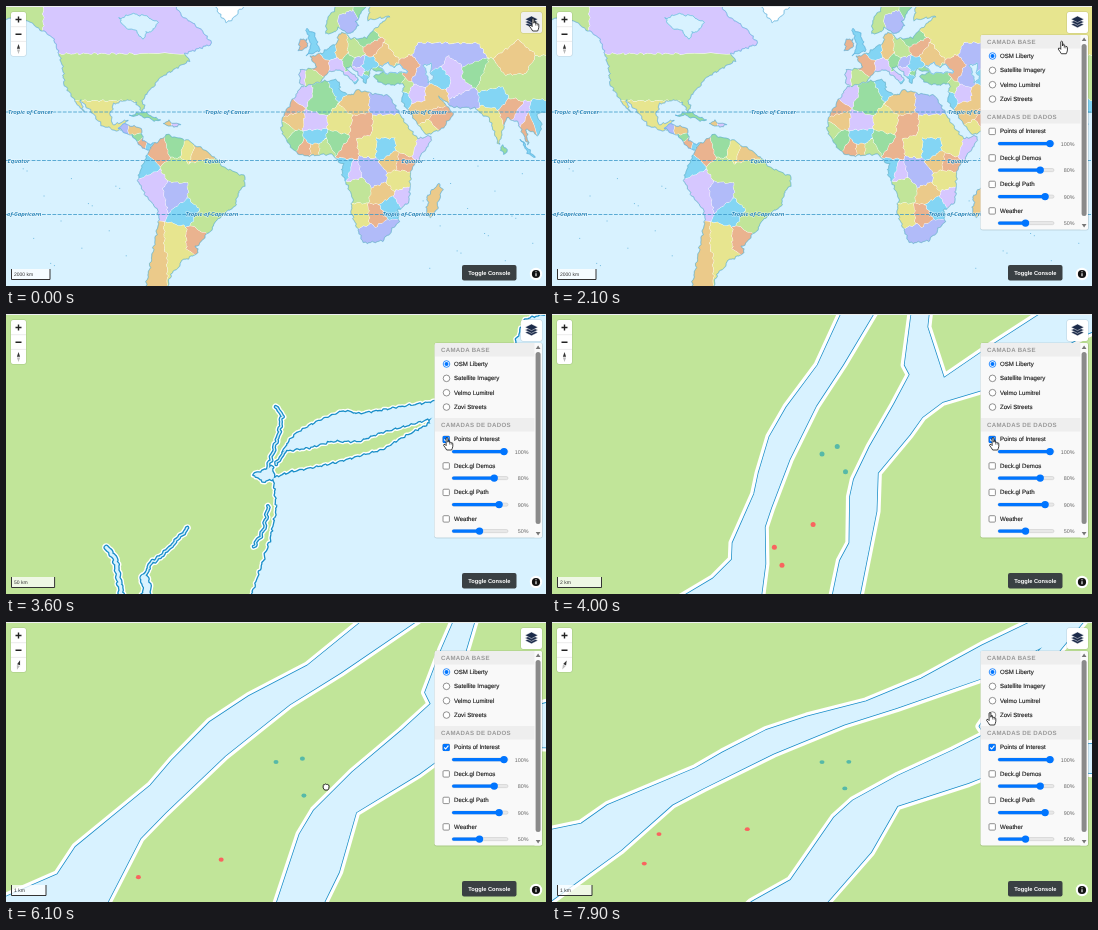
Animation, 540 px wide and 280 px high, one loop 8 s. Source, as an HTML page with a canvas:

```html
<!DOCTYPE html>
<html lang="pt">
<head>
<meta charset="utf-8">
<title>Map layers</title>
<style>
html,body{margin:0;width:100%;height:100%;overflow:hidden;background:#d8f2ff}
#stage{position:relative;width:540px;height:280px;overflow:hidden}
canvas,svg{position:absolute;left:0;top:0;width:540px;height:280px}
text{font-family:"Liberation Sans",Arial,sans-serif;font-size:6.1px;fill:#222;text-rendering:geometricPrecision}
.row{stroke:#222;stroke-width:.15px}
.head{font-weight:bold;letter-spacing:.3px;fill:#999}
.pct{font-size:5.4px;fill:#666;text-anchor:end}
</style>
</head>
<body>
<div id="stage">
<canvas id="map" width="540" height="280"></canvas>
<svg viewBox="0 0 540 280">
  <path d="M0 .5H540" stroke="#eef0f0"/>
  <g>
    <rect x="4.5" y="5.5" width="16" height="45" rx="2.5" fill="#000" opacity=".13"/>
    <rect x="5" y="6" width="15" height="44" rx="2" fill="#fff"/>
    <path d="M5 20.7H20M5 35.4H20" stroke="#ddd" stroke-width=".6"/>
    <path d="M9.5 13.5h6M12.5 10.5v6M9.5 28.2h6" stroke="#222" stroke-width="1.4"/>
    <g id="needle"><path d="M10.9 42.7L12.5 38L14.1 42.7Z" fill="#333"/><path d="M10.9 43.4L12.5 48L14.1 43.4Z" fill="#bbb"/></g>
  </g>
  <rect x="514.5" y="5.5" width="22" height="22" rx="2.5" fill="#000" opacity=".13"/>
  <rect id="layers" x="515" y="6" width="21" height="21" rx="2" fill="#fff"/>
  <g fill="#1c2b4a" stroke="#fff" stroke-width=".5">
    <path d="M519 18.5L525.5 15.5L532 18.5L525.5 21.8Z"/>
    <path d="M519 16L525.5 13L532 16L525.5 19.3Z"/>
    <path d="M519 13.3L525.5 10L532 13.3L525.5 16.6Z"/>
  </g>
  <rect id="bar" x="5" y="263" width="40" height="10.5" fill="#fff" fill-opacity=".75"/>
  <path id="edge" fill="none" stroke="#333"/>
  <text id="km" x="8" y="270" style="font-size:5px;fill:#333"></text>
  <rect x="456" y="259" width="54.5" height="15.5" rx="2" fill="#3a4043"/>
  <text x="483.3" y="269" text-anchor="middle" style="font-size:5.7px;font-weight:bold;fill:#fff">Toggle Console</text>
  <circle cx="530" cy="268" r="6.2" fill="#fff"/>
  <circle cx="530" cy="268" r="4.1" fill="#111"/>
  <path d="M530 267.3v3M530 265.2v1.1" stroke="#fff" stroke-width="1.1"/>
  <g id="panel"></g>
  <g id="hand">
    <path d="M-.9 0Q0-1.1.9 0V4.2Q2-.2 2.6 4.4Q3.8 3.7 4.2 4.9Q5.6 4.3 5.8 5.8V8.3Q5.5 10.4 4.6 12H-.3Q-1.8 9.5-3.4 7.4Q-3.4 5.9-2 6.4L-.9 7.6Z" fill="#fff" stroke="#111" stroke-width=".8"/>
    <path d="M2.6 4.4V6.5M4.2 5V6.7" stroke="#111" stroke-width=".5"/>
  </g>
  <path id="fist" d="M-2.8-1.2Q-2.6-3-1.3-2.3Q-.5-3.5.4-2.5Q1.4-3.2 2-2Q3.1-2.2 3.1-.8Q3.2 1.5 1.9 3.1H-1.4Q-3.5 1-2.8-1.2Z" fill="#fff" stroke="#111" stroke-width=".9"/>
</svg>
</div>
<script>
const LOOP = 8000, W = 540, H = 280, CX = 270, CY = 140;
const SEA = '#d8f2ff', COAST = '#198ec8', LAND = '#c1e599';
const HUES = {p:'#d6c7ff', o:'#ebca8a', g:LAND, y:'#e7e58f', t:'#98dda1', b:'#83d5f4', v:'#b1bbf9', r:'#eab38f', w:'#fff', s:SEA};
const $ = id => document.getElementById(id);
const ctx = $('map').getContext('2d');

// ---- layer panel ----
const label = (x, y, s, cls = 'row') => `<text x="${x}" y="${y}" class="${cls}">${s}</text>`;
const head = (y, s) => `<rect x="429" y="${y}" width="100" height="13.5" fill="#eee"/>` + label(435, y + 9.1, s, 'head');
const radio = (s, i) => {
  const y = 50 + 14.35 * i, hue = i ? '#777' : '#0075ff';
  return `<circle cx="440.5" cy="${y}" r="3.3" fill="#fff" stroke="${hue}" stroke-width=".8"/>` +
    (i ? '' : `<circle cx="440.5" cy="${y}" r="2" fill="${hue}"/>`) + label(448, y + 2, s);
};
const slider = ([s, pct], i) => {
  const y = 125.5 + 26.5 * i, w = 3 + pct * .49;
  return `<rect x="437" y="${y - 3.3}" width="6.4" height="6.4" rx="1" fill="#fff" stroke="#777" stroke-width=".8"/>` + label(448, y + 1.9, s) +
    `<rect x="446" y="${y + 10.5}" width="56" height="3.2" rx="1.6" fill="#e8e8e8" stroke="#bbb" stroke-width=".4"/>` +
    `<rect x="446" y="${y + 10.5}" width="${w}" height="3.2" rx="1.6" fill="#0075ff"/>` +
    `<circle cx="${446 + w}" cy="${y + 12.1}" r="3.7" fill="#0075ff"/>` + label(522.5, y + 14, pct + '%', 'pct');
};
$('panel').innerHTML =
  '<rect x="428" y="28.5" width="109" height="196" rx="3" fill="#000" opacity=".12"/>' +
  '<clipPath id="box"><rect x="428.5" y="29" width="107.5" height="194.5" rx="2"/></clipPath><g clip-path="url(#box)">' +
  '<rect x="428" y="29" width="108" height="195" fill="#f9f9f9"/>' +
  head(29, 'CAMADA BASE') + ['OSM Liberty', 'Satellite Imagery', 'Velmo Lumitrel', 'Zovi Streets'].map(radio).join('') +
  head(104, 'CAMADAS DE DADOS') +
  [['Points of Interest', 100], ['Deck.gl Demos', 80], ['Deck.gl Path', 90], ['Weather', 50]].map(slider).join('') +
  '<rect x="528.5" y="29" width="8" height="195" fill="#fafafa"/><rect x="529.6" y="38" width="5" height="172" rx="2.5" fill="#8a8a8a"/>' +
  '<path d="M529.7 35L532.1 31.4L534.5 35ZM529.7 218L532.1 221.6L534.5 218Z" fill="#777"/></g>' +
  '<g id="tick"><rect x="436.7" y="121.9" width="7" height="7" rx="1" fill="#0075ff"/>' +
  '<path d="M438.2 125.5L439.7 127L442.4 123.6" fill="none" stroke="#fff" stroke-width="1.1"/></g>';

// ---- geometry helpers ----
const pairs = s => {
  const n = s.split(' ').map(Number);
  return n.filter((_, i) => i % 2 === 0).map((x, i) => [x, n[2 * i + 1]]);
};
const mix = (a, b, u) => a.map((v, i) => v + (b[i] - v) * u);

// Splits edges and shifts every point by a field of its place, so shared borders still meet.
const warp = ([x, y]) => [
  x + .7 * Math.sin(y * .8 + x * .3) + .5 * Math.sin(y * 1.9 - x),
  y + .7 * Math.sin(x * .7 - y * .4) + .5 * Math.sin(x * 2.1 + y)];
const rough = (pts, open) => pts.flatMap((a, i) => {
  const b = pts[(i + 1) % pts.length];
  if (open && i === pts.length - 1) return [warp(a)];
  const n = Math.min(60, Math.ceil(Math.hypot(b[0] - a[0], b[1] - a[1]) / 2));
  return Array.from({length: n}, (_, k) => warp(mix(a, b, k / n)));
});
const addTo = (path, pts) => {
  pts.forEach((p, i) => i ? path.lineTo(...p) : path.moveTo(...p));
  path.closePath();
};

// The part of a wide box that lies nearer to one seed than to any other.
function cell(seed, seeds) {
  let poly = [[-60, -60], [600, -60], [600, 340], [-60, 340]];
  for (const other of seeds) {
    if (other === seed) continue;
    const far = p => Math.hypot(p[0] - seed[0], p[1] - seed[1]) ** 2 - Math.hypot(p[0] - other[0], p[1] - other[1]) ** 2;
    poly = poly.flatMap((a, i) => {
      const b = poly[(i + 1) % poly.length], fa = far(a), fb = far(b), out = fa <= 0 ? [a] : [];
      if (fa * fb < 0) out.push(mix(a, b, fa / (fa - fb)));
      return out;
    });
  }
  return poly;
}

// A coast, its base hue, and countries grown around a few seeds of each hue.
function land(hue, coast, countries = {}) {
  const edge = new Path2D(), groups = [];
  addTo(edge, rough(pairs(coast)));
  const sets = Object.entries(countries).map(([h, s]) => [h, pairs(s)]);
  const all = sets.flatMap(([, pts]) => pts);
  for (const [h, pts] of sets) {
    const path = new Path2D();
    pts.forEach(p => addTo(path, rough(cell(p, all))));
    groups.push([HUES[h], path]);
  }
  return {fill: HUES[hue], edge, groups};
}

const world = [
  land('p', '-5 -5 -5 12 20 14 48 32 57 62 58 78 72 100 78 106 74 93 96 119 108 124 117 125 121 114 107 119 104 108 108 98 120 94 130 96 136 105 139 103 136 94 143 85 156 70 172 61 184 55 178 48 200 40 206 38 196 24 176 10 165 -5',
    {p: '62 16 105 16 150 16', g: '12 16 62 80 105 80 150 80', y: '62 110 105 110'}),
  land('s', '113 13 125 8 141 10 152 17 146 25 140 26 138 32 133 30 131 25 118 21'),
  land('v', '112 123 118 118 135 122 137 135 143 138 150 137 150 141 143 145 134 139 126 130',
    {v: '117 124', t: '129 132', o: '128 124', r: '136 139', b: '145 141'}),
  land('t', '124 110 136 106 148 111 154 115 146 114 134 109'),
  land('o', '157 117 163 115 174 119 166 121', {o: '160 118', p: '170 118'}),
  land('w', '207 -5 214 8 221 17 229 10 242 -5'),
  land('g', '145 141 160 129 183 135 203 147 212 155 215 160 238 170 239 178 232 188 229 200 210 214 205 224 190 241 192 247 183 252 175 255 172 262 165 268 160 285 139 285 148 240 153 215 152 205 140 190 132 175 134 165',
    {g: '170 163 195 165 215 180 195 190 198 215', r: '153 145 188 234', t: '170 140', y: '184 143 172 234 176 255', o: '191 145 144 234 146 255',
     b: '138 160 180 205', p: '146 178 150 194', v: '168 190'}),
  land('y', '293 84 300 78 329 74 334 76 333 84 345 90 352 84 368 88 383 90 398 115 412 133 424 130 425 135 405 164 403 195 392 205 393 215 377 235 357 237 345 205 347 192 336 168 337 158 325 148 298 150 285 142 275 125 277 110',
    {p: '296 88 308 116 415 144 348 163 400 191', r: '284 103 355 120 343 145 396 157 371 209 300 143', o: '287 114 350 97 386 155 375 188 309 143',
     t: '318 86 314 97 330 136 287 135', b: '333 79 309 132 378 143 383 202 341 161', v: '377 97 360 160 368 170 362 230 382 225',
     y: '335 116 378 121 402 140 362 142 394 173 354 210', g: '279 126 354 184 318 143'}),
  land('o', '433 178 436 184 430 205 424 212 420 208 422 196 421 190'),
  land('y', '294 64 311 62 304 51 316 47 331 37 333 28 340 27 345 33 360 32 374 18 385 10 362 14 365 -5 545 -5 545 104 530 108 536 118 532 130 520 122 522 138 511 115 500 112 493 138 483 112 468 102 447 101 432 90 447 108 437 122 420 129 403 105 396 95 398 77 385 79 372 76 368 70 378 66 365 63 360 77 352 68 344 60 340 62 352 72 349 78 335 64 325 65 318 70 314 76 300 80 294 78',
    {y: '378 20 392 37 425 22 460 25 490 32 535 28 485 112 424 125', g: '304 72 349 46 400 81 485 74 510 80 535 72', p: '294 72 330 58 352 65 409 87 451 82 447 66 513 112',
     r: '316 58 366 41 405 67 434 115 504 106 523 118', o: '335 47 377 50 413 106 430 88 508 56', t: '343 54 362 33 365 67 378 74 390 74 466 66',
     v: '352 57 413 71 425 52 460 50 457 95', b: '324 47 362 60 359 75 397 92 436 74 489 92 531 115'}),
  land('s', '373 61 382 57 388 61 393 58 402 66 380 67'),
  land('s', '418 59 426 58 424 65 428 73 423 76'),
  land('g', '320 27 321 14 334 -5 363 -5 350 15 352 20 345 28 333 22 327 27', {g: '325 18 335 0', v: '341 15', t: '360 4'}),
  land('b', '300 23 308 27 312 39 314 45 301 49 305 40'), land('r', '294 34 301 33 301 42 293 45'),
  land('t', '496 139 501 144 498 148 495 144'), land('b', '515 134 529 151 522 148')
];

const inlet = (s, w) => ({pts: rough(pairs(s), true), w});
const region = [
  {pts: rough(pairs('268 164 286 158 330 149 375 136 421 110 427 91 460 86 492 66 515 8 540 2 800 -140 2400 -700 2400 2000 -500 2000 190 420 246 280 265 224 271 194'))},
  {pts: rough(pairs('277 137 288 121 312 108 336 98 352 101 430 88 428 103 372 119 352 127 325 127 304 133'))},
  {pts: rough(pairs('247 160 256 157 266 152 268 164 257 167'))},
  inlet('270 93 276 101 273 120 262 154', 1.4), inlet('270 150 281 134', 1.2),
  inlet('140 262 147 247 160 238 184 212', 1.5), inlet('130 300 144 274 140 262', 6),
  inlet('104 233 112 243 122 300', 3), inlet('263 190 258 214 248 232', 1.2)
];

// Offsets from the point the camera looks at.
const rivers = [
  '300 -1500 153 -564 92 -403 37 -236 -7 -140 -56 -74 -83 -27 -100 30 -107 63 -141 140 -142 166 -172 196 -330 290 -900 900 -110 300 -96 227 -89 173 -90 115 -80 85 -51 9 -9 -76 33 -140 110 -269 222 -536 420 -1500',
  '230 -700 152 -290 140 -216 130 -140 138 -125 113 -78 75 -12 50 40 44 67 43 140 28 168 15 230 -300 1300 40 1200 60 220 76 140 86 90 88 30 138 -30 158 -58 190 -82 257 -102 420 -190 1500 -600 1500 -750 420 -270 262 -168 192 -120 166 -200 175 -281 260 -700'
].map(s => ({pts: pairs(s)}));
const places = [['#56b9a8', pairs('0 0 24 -12 37 28')], ['#f9645f', pairs('-14 111 -75 147 -63 175')]];

// ---- key poses: [ms, a, b] ----
const at = (keys, t) => {
  const i = keys.findIndex(k => k[0] > t);
  if (i <= 0) return keys[i ? keys.length - 1 : 0].slice(1);
  const a = keys[i - 1], b = keys[i];
  return mix(a, b, (t - a[0]) / (b[0] - a[0])).slice(1);
};
const tilt = [[5300, 0, 0], [6100, 18, 33], [6900, 26, 54]];
// Dragging turns the map .8 degrees and pitches it .5 degrees per pixel.
const drag = tilt.map(([t, turn, pitch]) => [t, 342.5 - turn / .8, 231 - pitch * 2]);
const pointer = [[0, 527, 13], [900, 525, 16], [1900, 525, 16], [3000, 441, 124], [4950, 441, 124], ...drag,
  [7150, 309.5, 123], [7700, 434, 95], [7900, 438, 91]];
const FLY = 3304, FLY_MS = 1000, NEAR = 10.81, MID = 5.46, HOME = [165, 67];

// cubic-bezier(.25, .1, .25, 1)
function ease(x) {
  if (x <= 0) return 0;
  if (x >= 1) return 1;
  const curve = (u, a, b) => 3 * a * u * (1 - u) ** 2 + 3 * b * u * u * (1 - u) + u ** 3;
  let lo = 0, hi = 1;
  for (let i = 0; i < 24; i++) {
    const u = (lo + hi) / 2;
    if (curve(u, .25, .25) < x) lo = u; else hi = u;
  }
  return curve(lo, .1, 1);
}

// ---- drawing ----
const stroke = (color, width, path) => {
  ctx.strokeStyle = color;
  ctx.lineWidth = width;
  path ? ctx.stroke(path) : ctx.stroke();
};
const fill = (color, path) => {
  ctx.fillStyle = color;
  path ? ctx.fill(path) : ctx.fill();
};

function drawWater(list, project, k, halo, line) {
  ctx.fillStyle = LAND;
  ctx.fillRect(0, 0, W, H);
  for (const [color, extra] of [['#fff', halo], [COAST, line], [SEA, 0]])
    for (const {pts, w = 0} of list) {
      ctx.beginPath();
      pts.forEach(p => ctx.lineTo(...project(p)));
      if (!w) ctx.closePath();
      if (w || extra) stroke(color, w * k + extra);
      if (!w && !extra) fill(SEA);
    }
}

function drawWorld(z) {
  const k = 2 ** z, [cx, cy] = mix([CX, CY], HOME, 1 - 2 ** (-1.3 * z));
  ctx.fillStyle = SEA;
  ctx.fillRect(0, 0, W, H);
  ctx.save();
  ctx.setTransform(k, 0, 0, k, CX - cx * k, CY - cy * k);
  for (const {fill: base, edge, groups} of world) {
    stroke('#a9d8ef', 1.3 / k, edge);
    fill(base, edge);
    ctx.save();
    ctx.clip(edge);
    for (const [color, path] of groups) {
      stroke('#fff', .9 / k, path);
      fill(color, path);
    }
    ctx.restore();
    stroke('#4fa9d6', .5 / k, edge);
  }
  // Small islands in both oceans
  for (let i = 0; i < 34; i++) {
    ctx.fillStyle = '#7cc0e3';
    ctx.fillRect((i * 73.7 + 12) % 120 + (i % 2 ? 0 : 415), 152 + (i * 47.3) % 112, 1.1, 1);
  }
  ctx.setLineDash([3 / k, 2.2 / k]);
  for (const y of [106, 154.5, 208.5]) {
    ctx.beginPath();
    ctx.moveTo(0, y);
    ctx.lineTo(W, y);
    stroke('#3c9ac9', .8 / k);
  }
  ctx.restore();
  ctx.font = 'italic 600 6.1px "Open Sans", sans-serif';
  ctx.textAlign = 'center';
  ctx.textBaseline = 'middle';
  for (const [s, x0, y0] of [['Tropic of Cancer', 24.5, 106], ['Equator', 12.5, 155], ['Tropic of Capricorn', 9, 208.5]])
    for (let i = 0; i < 3; i++) {
      const x = CX + (x0 + 197 * i - cx) * k, y = CY + (y0 - cy) * k;
      ctx.strokeStyle = 'rgba(255,255,255,.6)';
      ctx.lineWidth = 1.2;
      ctx.strokeText(s, x, y);
      ctx.fillStyle = '#1077b0';
      ctx.fillText(s, x, y);
    }
}

function drawCity(z, turn, pitch) {
  const k = 2 ** (z - NEAR), rad = Math.PI / 180, d = 420;
  const c = Math.cos(turn * rad), s = Math.sin(turn * rad), cp = Math.cos(pitch * rad), sp = Math.sin(pitch * rad);
  const project = ([x, y]) => {
    const X = (x * c - y * s) * k, Y = (x * s + y * c) * k, f = 1 / Math.max(.15, 1 - Y * sp / d);
    return [CX + X * f, CY + Y * cp * f];
  };
  drawWater(rivers, project, k, 8, 1.5);
  for (const [color, pts] of places) for (const p of pts) {
    ctx.beginPath();
    ctx.ellipse(...project(p), 2.5, 2.5 * Math.max(cp, .75), 0, 0, 7);
    fill(color);
  }
}

function drawScale(z) {
  const per = 51.3 * 2 ** -z, max = 50 * per, ten = 10 ** Math.floor(Math.log10(max));
  const km = ten * [5, 3, 2, 1].find(n => n * ten <= max), w = km / per;
  $('bar').setAttribute('width', w);
  $('edge').setAttribute('d', `M5.5 263V273.5H${(5 + w).toFixed(1)}V263`);
  $('km').textContent = Math.round(km) + ' km';
}

function render(t) {
  const z = NEAR * ease((t - FLY) / FLY_MS), [turn, pitch] = at(tilt, t), [x, y] = at(pointer, t);
  ctx.lineJoin = ctx.lineCap = 'round';
  if (z < 3.8) drawWorld(z);
  else if (z < 8) {
    const k = 2 ** (z - MID);
    drawWater(region, p => [CX + (p[0] - CX) * k, CY + (p[1] - CY) * k], k, 5.4, 2.6);
  } else drawCity(z, turn, pitch);
  drawScale(z);
  const show = (id, on) => $(id).style.display = on ? '' : 'none';
  const overMap = t > 5000 && x < 429;
  show('panel', t >= 500);
  show('tick', t >= 3250);
  show('hand', !overMap);
  show('fist', overMap);
  for (const id of ['hand', 'fist']) $(id).setAttribute('transform', `translate(${x} ${y})`);
  $('layers').setAttribute('fill', t < 2100 ? '#f0f0f0' : '#fff');
  $('needle').setAttribute('transform', `rotate(${turn} 12.5 43)`);
}

const start = performance.now();
function tick() {
  render((performance.now() - start) % LOOP);
  requestAnimationFrame(tick);
}
tick();
</script>
</body>
</html>
```
